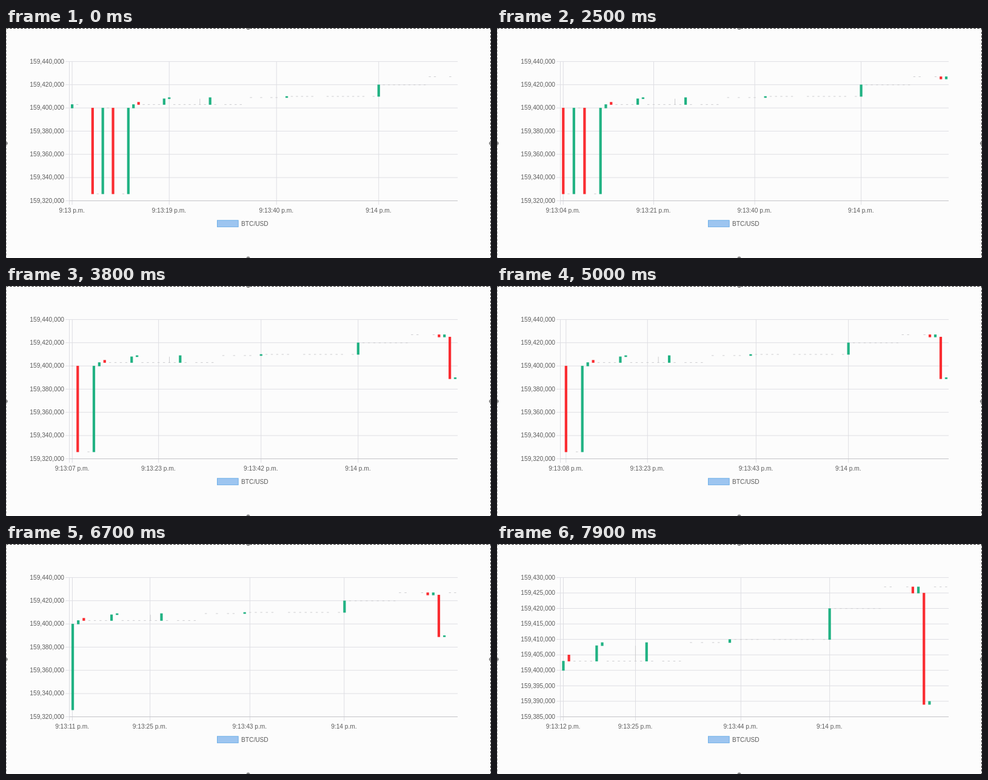
Animation of 800x380 px, one loop 8 s. Source, as an HTML page:

```html
<!DOCTYPE html>
<html lang="en">
<head>
<meta charset="utf-8">
<title>Live candlestick chart</title>
<style>
  html, body { margin: 0; width: 100%; height: 100%; overflow: hidden; background: #fcfcfc; }
  svg { display: block; width: 800px; height: 380px; }
  text { font: 10.2px "Liberation Sans", Arial, sans-serif; fill: #5c5c5c; }
  .grid { stroke: #dedee3; }
  .base { stroke: #c6c6ca; }
  .handle { fill: #888; }
</style>
</head>
<body>
<svg viewBox="0 0 800 380">
  <rect width="800" height="380" fill="#fcfcfc"/>
  <g id="axes"></g>
  <g id="candles" transform="translate(.4 .5)"></g>
  <rect x="348.5" y="317.8" width="34.6" height="10.8" fill="#9dc5f0" stroke="#6fb0e8"/>
  <text x="388" y="326.6">BTC/USD</text>
  <g fill="none" stroke-dasharray="4 2">
    <path d="M0 .5H800" stroke="#222"/>
    <path d="M.5 0V380" stroke="#aaa"/>
    <path d="M799.5 0V380" stroke="#333"/>
  </g>
  <g class="handle">
    <circle cx="399.5" cy="0" r="3"/>
    <circle cx="399.5" cy="380.5" r="3"/>
    <circle cx="0" cy="190.5" r="2.8"/>
    <circle cx="799.5" cy="190.5" r="2.8"/>
  </g>
</svg>
<script>
const LOOP = 8000, EASE_MS = 400, MINUTE = 60;
const LEFT = 104.5, RIGHT = 745, TOP = 55, BOTTOM = 285;
const UP = '#21b283', DOWN = '#fa2c31', FLAT = '#cdcdd0';

// Price moves by second: open, close and, where it differs, the price that follows.
// Prices are in thousands above 159 million.
const moves = {
  0: [400, 403], 12: [400, 403], 13: [405, 403], 18: [403, 408],
  19: [408, 409, 403], 27: [403, 409, 403], 35: [409, 409], 42: [409, 410],
  60: [410, 420], 70: [427, 427], 75: [427, 425], 76: [425, 427],
  77: [425, 389], 78: [389, 390, 427]
};
[4, 6, 8, 11].forEach((t, i) => moves[t] = i % 2 ? [326, 400] : [400, 326]);
const wick = { t: 25, high: 408 };
const quiet = new Set([2, 3, 9, 29, 34, 36, 38, 41, 48, 49, 58, 72, 73]);

const points = [];
let price;
for (let t = 0; t <= 81; t++) {
  if (quiet.has(t)) continue;
  const [open, close, rest = close] = moves[t] || [price, price];
  points.push({ t, open, close });
  price = rest;
}

// Each trade [arrival ms, second] drops the oldest one; second 8 holds two trades
const trades = [
  [0, 74], [800, 75], [1800, 76], [3500, 77], [3500, 77], [3500, 78],
  [4200, 78], [5300, 79], [6000, 79], [6500, 80], [7200, 81]
];
const oldest = [...points.map(p => p.t), 8].sort((a, b) => a - b);
const views = trades.map(([start, last], i) => makeView(start, oldest[i], last));

function makeView(start, first, last) {
  const shown = points.filter(p => p.t >= first && p.t <= last);
  const ts = shown.map(p => p.t);

  // Pad each end by half the gap to the neighbouring point
  const from = first - (ts[1] - first) / 2;
  const to = last + (last - ts[ts.length - 2]) / 2;

  // Round price step giving at most ten intervals
  const prices = shown.flatMap(p => [p.open, p.close]);
  const lo = Math.min(...prices), hi = Math.max(...prices);
  const step = [1, 2, 5, 10, 20, 50].find(s => s >= (hi - lo) / 10);
  const min = Math.floor(lo / step) * step;
  const max = Math.ceil(hi / step) * step;

  // Four labels spread evenly over the points up to the full minute
  const span = ts.indexOf(MINUTE);
  const ticks = [0, 1, 2, 3].map(i => ts[Math.round(i * span / 3)]);

  const x = t => LEFT + (t - from) / (to - from) * (RIGHT - LEFT);
  const y = v => BOTTOM - (v - min) / (max - min) * (BOTTOM - TOP);
  return { start, first, last, ticks, min, max, step, x, y };
}

const line = (x1, y1, x2, y2, cls = 'grid') =>
  `<path class="${cls}" d="M${x1} ${y1}L${x2} ${y2}"/>`;
const label = (x, y, anchor, s) =>
  `<text x="${x}" y="${y}" text-anchor="${anchor}">${s}</text>`;

function clock(t) {
  const sec = t % MINUTE;
  const tail = sec ? ':' + String(sec).padStart(2, '0') : '';
  return `9:${13 + Math.floor(t / MINUTE)}${tail} p.m.`;
}

function drawAxes(view) {
  let out = '';
  for (let v = view.min; v <= view.max; v += view.step) {
    const y = view.y(v);
    out += line(98, y + 0.4, RIGHT, y + 0.4) + label(96, y + 3.7, 'end', `159,${v},000`);
  }
  for (const t of view.ticks) {
    const x = view.x(t);
    out += line(x + 0.4, TOP, x + 0.4, 292) + label(x, 304.6, 'middle', clock(t));
  }
  out += line(LEFT, TOP, LEFT, 292);
  out += line(LEFT, BOTTOM + 0.5, RIGHT, BOTTOM + 0.5, 'base');
  document.getElementById('axes').innerHTML = out;
}

const layer = document.getElementById('candles');
function addRect() {
  const el = document.createElementNS('http://www.w3.org/2000/svg', 'rect');
  layer.append(el);
  return el;
}
function setRect(el, x, y, width, height, fill) {
  const attrs = { x, y, width, height, fill };
  for (const k in attrs) el.setAttribute(k, attrs[k]);
}
const wickEl = addRect();
for (const p of points) p.el = addRect();

function drawCandles(index, k) {
  const now = views[index], prev = views[Math.max(0, index - 1)];
  const mix = (a, b) => a + (b - a) * k;
  const xAt = t => t > prev.last ? now.x(t) : mix(prev.x(t), now.x(t));
  const yAt = (t, v) => t > prev.last ? now.y(v) : mix(prev.y(v), now.y(v));

  for (const { t, open, close, el } of points) {
    const shown = t >= now.first && t <= now.last;
    el.style.display = shown ? '' : 'none';
    if (!shown) continue;
    const x = xAt(t);
    const top = yAt(t, Math.max(open, close));
    const bottom = yAt(t, Math.min(open, close));
    if (open === close) setRect(el, x - 1.7, top - 0.5, 3.4, 1, FLAT);
    else setRect(el, x - 2.1, top - 0.3, 4.2, bottom - top + 0.7, close > open ? UP : DOWN);
    if (t === wick.t) {
      const high = yAt(t, wick.high);
      setRect(wickEl, x - 0.5, high, 1, bottom - high, FLAT);
    }
  }
}

let shownView = -1;
function frame() {
  const time = performance.now() % LOOP;
  let index = views.length - 1;
  while (views[index].start > time) index--;
  if (index !== shownView) drawAxes(views[shownView = index]);
  const p = Math.min(1, (time - views[index].start) / EASE_MS);
  drawCandles(index, 1 - (1 - p) ** 4);
  requestAnimationFrame(frame);
}
frame();
</script>
</body>
</html>
```
